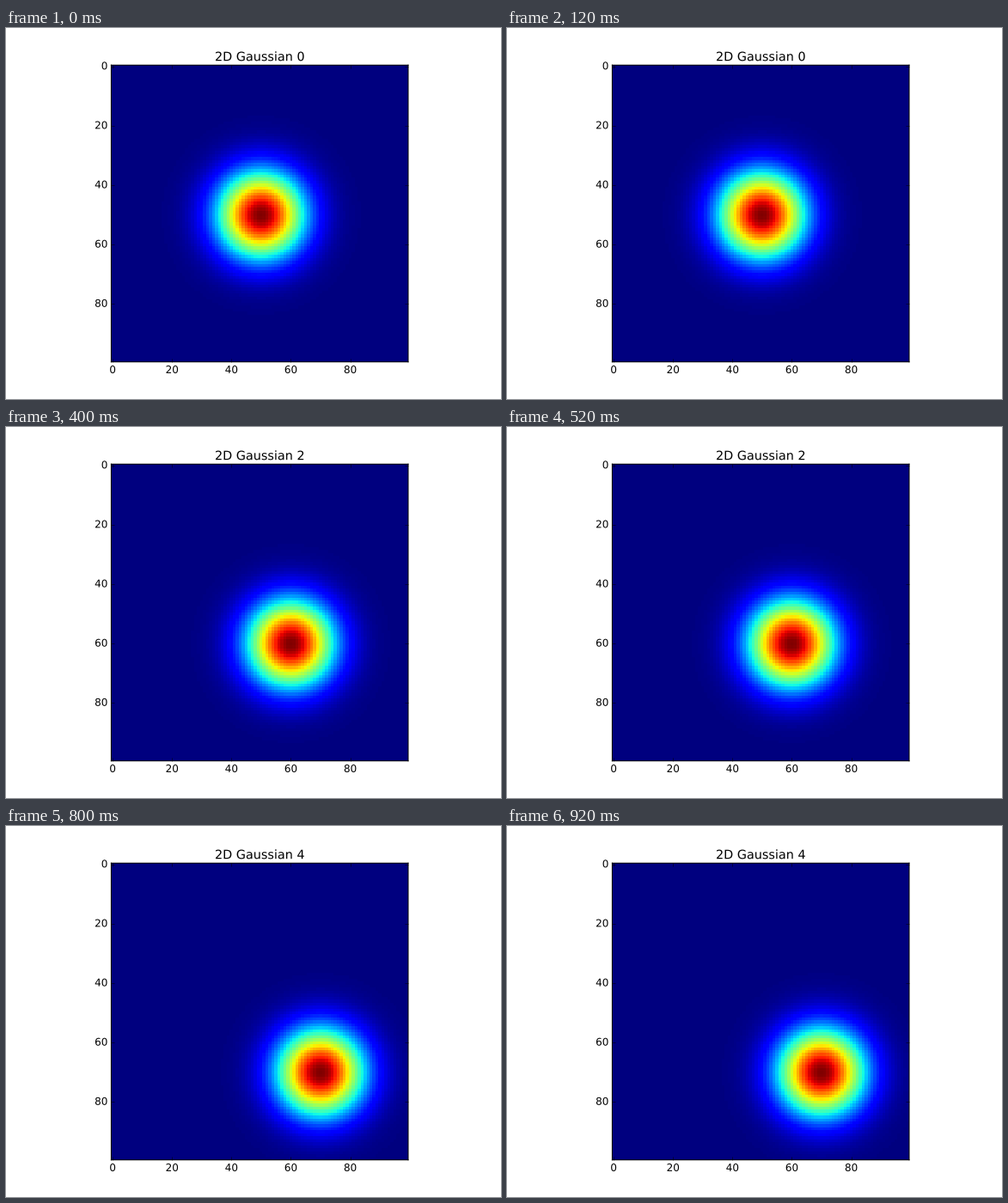
These frames come from a looping animation (576x432 px, 1000 ms). A matplotlib script:

```python
import matplotlib.pyplot as plt
import numpy as np
from matplotlib.animation import FuncAnimation
from matplotlib.patheffects import Normal

SIZE = 100
SIGMA = 10
FRAMES = 5

plt.style.use("classic")
plt.rcParams.update({
    "font.family": "DejaVu Sans",
    "text.hinting": "no_hinting",
    "figure.dpi": 72,
    "savefig.dpi": "figure",
    "figure.facecolor": "white",
    "savefig.facecolor": "white",
})


def gaussian(center):
    """Square 2D bell with its peak at (center, center)."""
    x = np.arange(SIZE)
    y = x[:, np.newaxis]
    distance2 = (x - center) ** 2 + (y - center) ** 2
    return np.exp(-distance2 / (2 * SIGMA ** 2))


fig, ax = plt.subplots(figsize=(8, 6))
image = ax.imshow(gaussian(50), cmap="jet", vmin=0, vmax=1,
                  interpolation="nearest")
ax.set_xticks(range(0, SIZE, 20))
ax.set_yticks(range(0, SIZE, 20))
title = ax.set_title("2D Gaussian 0")

# Vector-like rendering: glyph outlines and frame lines at subpixel positions.
for text in [title, *ax.get_xticklabels(), *ax.get_yticklabels()]:
    text.set_path_effects([Normal()])
for line in [*ax.spines.values(), *ax.get_xticklines(), *ax.get_yticklines()]:
    line.set_snap(False)


def update(i):
    image.set_data(gaussian(50 + 5 * i))
    title.set_text(f"2D Gaussian {i}")
    return image, title


anim = FuncAnimation(fig, update, frames=FRAMES, interval=200,
                     repeat=True, repeat_delay=0, blit=False)
plt.show()
```
